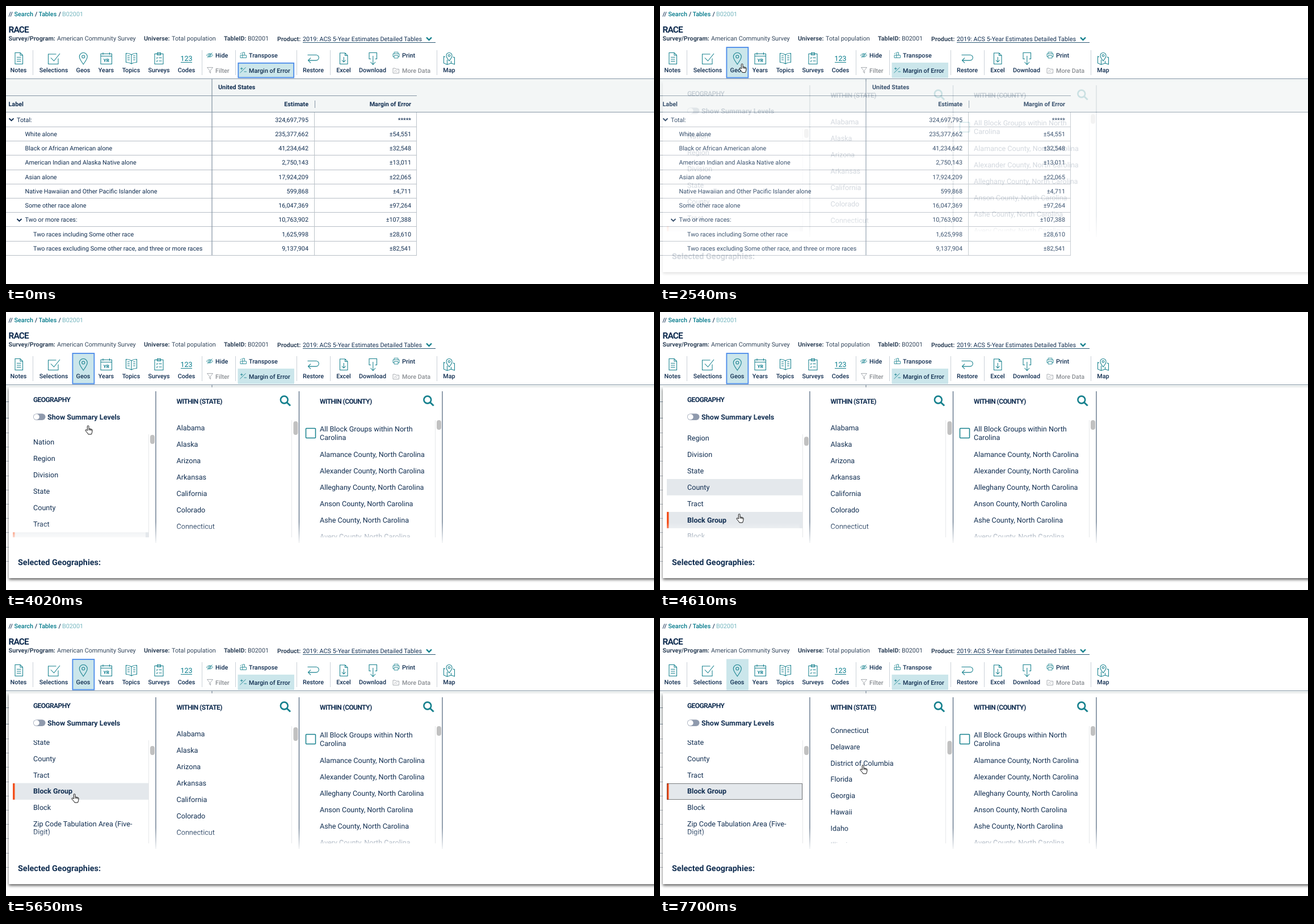
An HTML page for the animation above (8 s loop, 1142x491 px).

```html
<!DOCTYPE html>
<html lang="en">
<head>
<meta charset="utf-8">
<title>Table with geography filter</title>
<style>
  html, body { margin: 0; width: 100%; height: 100%; overflow: hidden; background: #fff; }
  svg { display: block; width: 100vw; height: 100vh; }
  text { font: 10.8px Roboto, sans-serif; fill: #112e51; white-space: pre; text-rendering: geometricPrecision; }
  .med { font-weight: 500; }
  .bold { font-weight: 700; }
  .meta { fill: #33465c; }
  .list { font-size: 12.6px; }
  .large { font-size: 14.4px; }
  .code { font-size: 12.4px; }
  .tiny { font-size: 8px; }
  .head { font-size: 12px; font-weight: 700; letter-spacing: -.6px; }
  .title { font-size: 15.4px; font-weight: 700; letter-spacing: -.9px; }
  .end { text-anchor: end; }
  .mid { text-anchor: middle; }
  .teal { fill: #00798a; }
  .pale { fill: #74b6bf; }
  .off { fill: #8a8e93; }
  .icon { fill: none; stroke: #15808d; stroke-width: 1.05; }
  .small { stroke-width: .85; }
  .gray { stroke: #9a9fa4; }
  .ring { fill: none; stroke: #4a8aea; stroke-width: 1.8; }
  .on { fill: #cbe6eb; }
  .row { fill: #e4e8ec; }
  .thumb { fill: #c1c1c1; }
</style>
</head>
<body>
<svg id="stage" viewBox="0 0 1142 491" preserveAspectRatio="none"></svg>
<script>
const text = (x, y, str, cls = '') => `<text x="${x}" y="${y}" class="${cls}">${str}</text>`;
const rect = (x, y, w, h, attrs = '') => `<rect x="${x}" y="${y}" width="${w}" height="${h}" ${attrs}/>`;
const path = (d, attrs = 'class="icon"') => `<path d="${d}" ${attrs}/>`;
const line = (d, color, width = 1) => path(d, `fill="none" stroke="${color}" stroke-width="${width}"`);
const group = (id, body, attrs = '') => `<g id="${id}" ${attrs}>${body}</g>`;
const each = (list, fn) => list.map(fn).join('');

const NAVY = '#112e51', TEAL = '#15808d', ROW = 28.85, GEO_TOP = 230, STATE_TOP = 205;

function heading() {
  return text(4.5, 18, '//', 'med') + text(14.5, 18, 'Search', 'med teal') + text(51, 18, '/', 'med') +
    text(57.5, 18, 'Tables', 'med teal') + text(92.5, 18, '/', 'med') + text(99, 18, 'B02001', 'pale') +
    text(4.5, 47, 'RACE', 'title') +
    each([[4.5, 'Survey/Program:', 90, 'American Community Survey'], [243, 'Universe:', 292, 'Total population'],
      [384, 'TableID:', 426, 'B02001']], ([x, label, vx, value]) =>
      text(x, 61, label, 'bold meta') + text(vx, 61, value, 'meta')) +
    text(478, 62, 'Product:', 'bold meta') + text(523, 61.5, '2019: ACS 5-Year Estimates Detailed Tables') +
    line('M523 64.5H757', '#2b5873') + line('M741 55.5l4.5 4.5 4.5-4.5', TEAL, 2.4);
}

function toolbar() {
  const labels = [['Notes', 22], ['Selections', 84], ['Geos', 136], ['Years', 176.5], ['Topics', 220.5],
    ['Surveys', 269.5], ['Codes', 318], ['Restore', 541.5], ['Excel', 595], ['Download', 646], ['Map', 781]];
  const icons = [
    'M16 82.5h9l4.5 4.5v15.5h-13.5zM25 82.5v4.5h4.5M19 90.5h7.5M19 94h7.5M19 97.5h7.5',
    'M92 92.5v10h-17.5v-17.5h14M79 91.5l5.5 5.5 10.5-13',
    'M136.3 103c-4-6-7-9.5-7-13.5a7 7 0 0 1 14 0c0 4-3 7.5-7 13.5zM133.8 89.5a2.5 2.5 0 1 0 5 0a2.5 2.5 0 1 0-5 0',
    'M167 84.5h19.5v18h-19.5zM167 88.5h19.5M171 82v4M182.5 82v4',
    'M221 86c-3-2-6.5-2.5-9.5-2.5v16c3.5 0 6.5.5 9.5 2.5 3-2 6-2.5 9.5-2.5v-16c-3 0-6.5.5-9.5 2.5zv16M214 88h4M214 91.5h4M214 95h4M224 88h4M224 91.5h4M224 95h4',
    'M262 84.5h15v18h-15zM266.5 82.5h6v4h-6zM265 91.5l1 1 1.5-2M265 97l1 1 1.5-2M269.5 91.5h5M269.5 97h5',
    'M308 99.5h20',
    'M531.5 86.5h15a4.8 4.8 0 0 1 0 9.6h-14M537 91.6l-4.5 4.5 4.5 4.5',
    'M588.5 83h9l4.5 4.5v15h-13.5zM597.5 83v4.5h4.5M595.3 90v9M591.8 95.5l3.5 3.5 3.5-3.5',
    'M643 93.5h-3v-11h13.5v11h-3M646.8 88v15.5M642.5 99l4.3 4.5 4.3-4.5',
    'M774 90l-2.5-1v12l6 2.5 7-2.5 6 2v-12l-3-1M777.5 95v8.5M784.5 97v4M781 97c-3-4-5-6-5-9.5a5 5 0 0 1 10 0c0 3.5-2 5.5-5 9.5zM779.2 87.5a1.8 1.8 0 1 0 3.6 0a1.8 1.8 0 1 0-3.6 0'];
  const smallIcons = [
    'M353.5 87c3-4 8-4 11 0-3 4-8 4-11 0zM357 87a2 2 0 1 0 4 0a2 2 0 1 0-4 0M355 91.5l8.5-9',
    'M413 87h4v4.5h-4zM417 87h6.5v4.5h-6.5M417 87v-5h3.5v5M413 85l2-2.5',
    'M412.5 118l10-9.5M413 110.5h4.5M415.2 108.3v4.5M419.5 116h4.5',
    'M684 84.5v-3h7v3M684 89.5h-2v-5h11v5h-2M684 87.5h7v4.5h-7z'];
  const grayIcons = ['M354.5 108.5h10l-4 5v5l-2-1.5v-3.5z',
    'M682 110h4l1 1.5h5.5v7h-10.5zM684 116l2-2 2 1.5 2-2'];
  return rect(408.5, 100, 99.5, 27, 'class="on"') + group('geosFill', rect(117, 72.5, 39, 55, 'class="on"')) +
    line('M47.5 78V122' + each([345.5, 404.5, 512.5, 571.5, 759.5], x => `M${x} 78V122`), '#cbd1d8') +
    each(icons, d => path(d)) + each(smallIcons, d => path(d, 'class="icon small"')) +
    each(grayIcons, d => path(d, 'class="icon small gray"')) +
    each(labels, ([s, x]) => text(x, 117, s, 'med mid')) +
    text(318, 96.5, '123', 'mid teal code') + text(176.8, 99, 'YR', 'mid teal bold tiny') +
    text(369, 90.5, 'Hide', 'med') + text(369, 117.5, 'Filter', 'med off') +
    text(428, 90.5, 'Transpose', 'med') + text(428, 117.5, 'Margin of Error', 'med') +
    text(698, 90.5, 'Print', 'med') + text(698, 117.5, 'More Data', 'med off') +
    group('marginRing', rect(409.4, 100.8, 97.8, 25.6, 'class="ring"')) +
    group('geosRing', rect(117.4, 73.1, 38, 53.5, 'class="ring"'));
}

function table() {
  const rows = [
    [19, 'Total:', '324,697,795', '*****'], [33.5, 'White alone', '235,377,662', '±54,551'],
    [33.5, 'Black or African American alone', '41,234,642', '±32,548'],
    [33.5, 'American Indian and Alaska Native alone', '2,750,143', '±13,011'],
    [33.5, 'Asian alone', '17,924,209', '±22,065'],
    [33.5, 'Native Hawaiian and Other Pacific Islander alone', '599,868', '±4,711'],
    [33.5, 'Some other race alone', '16,047,369', '±97,264'],
    [33.5, 'Two or more races:', '10,763,902', '±107,388'],
    [48, 'Two races including Some other race', '1,625,998', '±28,610'],
    [48, 'Two races excluding Some other race, and three or more races', '9,137,904', '±82,541']];
  return rect(0, 129, 1142, 58, 'fill="#f3f6f6"') +
    line('M0 128.5H1142M0 187.5H1142M0 158.5H724M544.5 167V180', '#8596a5') +
    text(374, 147.3, 'United States', 'bold') + text(4.5, 177.2, 'Label', 'bold') +
    text(533, 177.2, 'Estimate', 'bold end') + text(714, 177.2, 'Margin of Error', 'bold end') +
    each(rows, ([x, label, estimate, margin], i) => {
      const y = 204.7 + 25.25 * i, edge = Math.floor(213.5 + 25.2 * i) + .5;
      return text(x, y, label) + text(533, y, estimate, 'end') + text(714, y, margin, 'end') +
        line(`M0 ${edge}H724`, '#b7bec6');
    }) +
    line('M543.5 188V440M723.5 188V440', '#bcc3ca') + line('M363 129V440', '#8192a2', 1.2) +
    line('M5.5 198.5l4 4 4-4M19.5 376l4 4 4-4', NAVY, 1.9);
}

function panel() {
  const geos = ['Nation', 'Region', 'Division', 'State', 'County', 'Tract', 'Block Group', 'Block',
    'Zip Code Tabulation Area (Five-'];
  const states = ['Alabama', 'Alaska', 'Arizona', 'Arkansas', 'California', 'Colorado', 'Connecticut',
    'Delaware', 'District of Columbia', 'Florida', 'Georgia', 'Hawaii', 'Idaho', 'Illinois'];
  const counties = ['Alamance', 'Alexander', 'Alleghany', 'Anson', 'Ashe', 'Avery'];
  const block = GEO_TOP + 6 * ROW;
  const column = (x, top, body) => `<g clip-path="url(#clip${top})">${body}</g>` +
    rect(x, 372, 234, 27, 'fill="url(#fade)"');
  const search = x => `<circle cx="${x}" cy="155" r="6.4" fill="none" stroke="${TEAL}" stroke-width="2.6"/>` +
    line(`M${x + 4.5} 159.5l6.3 6`, TEAL, 3);

  const geoList = group('geoScroll',
    rect(12, 0, 239, ROW, 'id="geoHover" class="row"') +
    rect(12, block - 14, 239, 28.8, 'class="row"') + rect(12, block - 14, 3.5, 28.8, 'fill="#f4511e"') +
    group('blockFocus', rect(12.5, block - 13.5, 238, 28, 'fill="none" stroke="#111" stroke-dasharray="1 1"')) +
    each(geos, (s, i) => text(48, GEO_TOP + 4.4 + ROW * i, s, 'list' + (i === 6 ? ' bold' : ''))) +
    text(48, GEO_TOP + 18.8 + ROW * 8, 'Digit)', 'list'));
  const stateList = group('stateScroll',
    rect(264.5, STATE_TOP + 1.5 * ROW, 238.5, ROW, 'id="stateHover" class="row"') +
    each(states, (s, i) => text(300.5, STATE_TOP + 4.4 + ROW * i, s, 'list')));
  const countyList = text(553, 211.4, 'All Block Groups within North', 'list') + text(553, 225.8, 'Carolina', 'list') +
    rect(528.5, 205.5, 17, 17, `rx="1" fill="#fff" stroke="${TEAL}" stroke-width="1.5"`) +
    each(counties, (s, i) => text(553, 256.4 + ROW * i, s + ' County, North Carolina', 'list'));

  return rect(5, 133, 1150, 337, 'fill="#fff" filter="url(#shadow)"') +
    column(12, 216, geoList) + column(266, 191, stateList) + column(519, 191, countyList) +
    each([264, 516.5, 769], x => rect(x - .6, 140, 1.2, 268, 'fill="url(#divider)"')) +
    line('M251.5 216V398M503.5 191V398M756.5 191V398', '#e6e8ea') +
    rect(254, 217, 8, 16, 'id="geoThumb" class="thumb" rx="4"') +
    rect(506.5, 193, 8, 24, 'id="stateThumb" class="thumb" rx="4"') +
    rect(759, 191, 8, 17, 'class="thumb" rx="4"') +
    text(48, 158.7, 'GEOGRAPHY', 'head') + text(300.5, 161.5, 'WITHIN (STATE)', 'head') +
    text(553, 161.5, 'WITHIN (COUNTY)', 'head') + search(490.3) + search(742.8) +
    rect(48, 179.5, 21.5, 11.5, 'rx="5.75" fill="#8f9aad"') + '<circle cx="53.7" cy="185.2" r="5" fill="#fff"/>' +
    text(73, 189.6, 'Show Summary Levels', 'list bold') + text(21, 447, 'Selected Geographies:', 'bold large');
}

const hand = path('M3.3 9.5V2.1a1.35 1.35 0 0 1 2.7 0V6l4.6 1q1.6.4 1.5 2l-.4 3.5-1.2 3.5h-5.5l-1.2-2-3.6-4.2q-.8-1.7.8-1.9 1 0 2.3 1.6zM6 6.3V9M8.2 6.6V9.3M10.2 7.2V9.6',
  'fill="#fff" stroke="#111" stroke-linejoin="round"');

document.getElementById('stage').innerHTML = `<defs>
  <clipPath id="clip216">${rect(10, 216, 243, 182)}</clipPath>
  <clipPath id="clip191">${rect(264, 191, 500, 207)}</clipPath>
  <linearGradient id="fade" x2="0" y2="1"><stop stop-color="#fff" stop-opacity="0"/><stop offset="1" stop-color="#fff" stop-opacity=".8"/></linearGradient>
  <linearGradient id="divider" x2="0" y2="1"><stop offset=".86" stop-color="#4a6079"/><stop offset="1" stop-color="#4a6079" stop-opacity=".1"/></linearGradient>
  <filter id="shadow" x="-5%" y="-5%" width="110%" height="110%"><feDropShadow dx="0" dy="2.7" stdDeviation="2.4" flood-opacity=".62"/></filter>
  </defs>` + table() + heading() + toolbar() + group('panel', panel()) + group('cursor', hand);

// Motion is sampled once per TICK; keys are [tick, value...].
const TICK = 147.9, LOOP = 8000;
const cursorKeys = [[7, 401, 467], [8, 385, 432], [9, 345, 350], [10, 290, 255], [11, 235, 175], [12, 193, 127],
  [14, 143, 105], [19, 138, 99], [22, 138, 99], [24, 139, 108], [27, 140, 200], [28, 138, 300], [29, 135, 356],
  [34, 135, 356], [37, 124, 316], [39, 108, 304], [42, 106, 303], [43, 115, 302], [44, 190, 285],
  [45, 280, 270], [46, 332, 262], [48, 351, 259], [49, 353, 259]];
const panelKeys = [[16, 0], [18, .36], [19, .66], [20, .85], [22, 1]];
const geoKeys = [[30, 0], [31, 36], [32, 80], [33, 97.1]];
const stateKeys = [[48, 0], [49, 35], [50, 90], [51, 150], [52, 179.6]];
const geoHoverKeys = [[0, -1], [28, 2], [29, 4], [35, 8], [36, 7], [37, 6], [44, 5], [45, -1]];

function sample(keys, k) {
  const i = keys.findIndex(key => key[0] > k);
  if (i === 0) return keys[0].slice(1);
  if (i < 0) return keys[keys.length - 1].slice(1);
  const a = keys[i - 1], b = keys[i], p = (k - a[0]) / (b[0] - a[0]);
  return a.slice(1).map((v, j) => v + (b[j + 1] - v) * p);
}
const held = (keys, k) => keys.filter(key => key[0] <= k).pop()[1];
const el = id => document.getElementById(id);
const show = (id, on) => el(id).setAttribute('visibility', on ? 'visible' : 'hidden');
const move = (id, x, y) => el(id).setAttribute('transform', `translate(${x} ${y})`);

function draw(time) {
  const k = Math.max(0, Math.floor((time - 8) / TICK));
  const [geo] = sample(geoKeys, k), [state] = sample(stateKeys, k);
  const hover = held(geoHoverKeys, k);
  move('cursor', ...sample(cursorKeys, k));
  move('geoScroll', 0, -geo);
  move('geoThumb', 0, geo * .092);
  move('stateScroll', 0, -state);
  move('stateThumb', 0, state * .134);
  el('panel').setAttribute('opacity', sample(panelKeys, k)[0]);
  el('geoHover').setAttribute('y', GEO_TOP + (hover - .5) * ROW);
  show('geoHover', hover >= 0);
  show('stateHover', k >= 45);
  show('cursor', k >= 7);
  show('geosFill', k >= 15);
  show('marginRing', k < 16);
  show('geosRing', k >= 16 && k < 39);
  show('blockFocus', k >= 39);
}

const start = performance.now();
function loop() {
  draw((performance.now() - start) % LOOP);
  requestAnimationFrame(loop);
}
loop();
</script>
</body>
</html>
```
